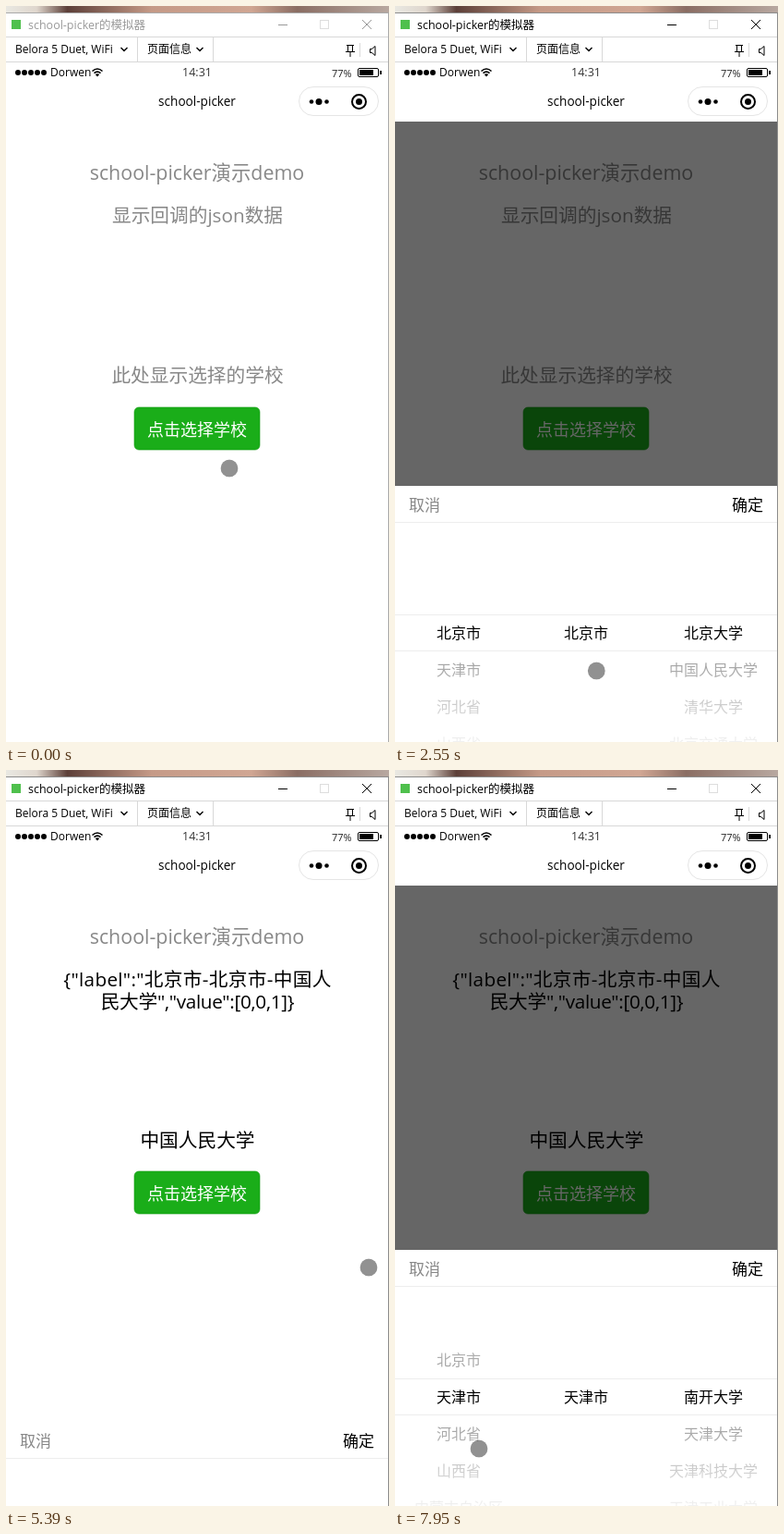
Recreate the animation shown at these times as an HTML page. Size 415 by 796 pixels, loop 8 s.

```html
<!DOCTYPE html>
<html lang="zh-CN">
<head>
<meta charset="utf-8">
<title>school-picker</title>
<style>
  html, body { margin: 0; width: 100%; height: 100%; overflow: hidden; background: #fff; }
  svg { display: block; }
  text { font-family: "Open Sans", "Noto Sans CJK SC", "Noto Sans CJK", sans-serif; white-space: pre; }
  .mid { text-anchor: middle; }
  .end { text-anchor: end; }
  .ui { font-size: 12px; }
  .copy { font-size: 20.7px; text-anchor: middle; }
  .rows { font-size: 16px; text-anchor: middle; }
  .head { font-size: 17px; }
  .line { fill: none; stroke: #000; }
  .rule { fill: none; stroke: #e5e5e5; }
  #window { --ink: #999; --edge: #aaa; }
  #window.active { --ink: #000; --edge: #8c8c8c; }
  #window text { fill: var(--ink); }
  #window path { fill: none; stroke: var(--ink); }
  #button rect { fill: #1aad19; stroke: #179c16; stroke-width: .6; }
  #button text { fill: #fff; font-size: 18px; }
  #button.pressed rect { fill: #179b16; }
  #button.pressed text { fill-opacity: .6; }
</style>
</head>
<body>
<svg width="415" height="796" viewBox="0 0 415 796">
  <defs>
    <linearGradient id="photo">
      <stop offset="0" stop-color="#e9e8e2"/>
      <stop offset=".08" stop-color="#dfd6cd"/>
      <stop offset=".16" stop-color="#5c3f38"/>
      <stop offset=".38" stop-color="#c59a87"/>
      <stop offset=".64" stop-color="#d0a693"/>
      <stop offset=".76" stop-color="#8a6d63"/>
      <stop offset="1" stop-color="#b8a8a0"/>
    </linearGradient>
    <linearGradient id="fadeTop" x2="0" y2="1">
      <stop offset="0" stop-color="#fff" stop-opacity=".95"/>
      <stop offset="1" stop-color="#fff" stop-opacity=".6"/>
    </linearGradient>
    <linearGradient id="fadeBottom" x2="0" y2="1">
      <stop offset="0" stop-color="#fff" stop-opacity=".6"/>
      <stop offset="1" stop-color="#fff" stop-opacity=".95"/>
    </linearGradient>
  </defs>

  <rect width="415" height="796" fill="#fff"/>
  <rect width="415" height="7" fill="url(#photo)"/>

  <!-- window frame -->
  <g id="window">
    <path d="M0 7.5H415M414.5 8V796" style="stroke:var(--edge)"/>
    <rect x="6" y="15" width="10" height="10" fill="#4fc04d"/>
    <text x="24" y="24.5" font-size="12.5">school-picker的模拟器</text>
    <path d="M295 20.5H305M386 15L396 25M396 15L386 25"/>
    <rect x="340.5" y="15.5" width="9" height="9" fill="none" stroke="#ddd"/>
  </g>

  <!-- toolbar -->
  <path class="rule" d="M0 33.5H414M0 60.5H414M142.5 34V60M224.5 34V60M383.5 40V55" style="stroke:#d8d8d8"/>
  <text class="ui" x="10" y="51">Belora 5 Duet, WiFi</text>
  <text class="ui" x="153" y="51">页面信息</text>
  <path class="line" d="M124.5 45L128 48.5L131.5 45M206.5 45L210 48.5L213.5 45" stroke-width="1.4"/>
  <path class="line" d="M369 42.5H377M370.5 43V49M375.5 43V49M368 49.5H378M373 50V55"/>
  <path class="line" d="M394.5 46.5H396.5L400 43.5V53.5L396.5 50.5H394.5Z"/>

  <!-- status bar -->
  <g id="signal"></g>
  <text class="ui" x="48" y="76">Dorwen</text>
  <path class="line" d="M93.5 70.5Q99 65.5 104.5 70.5M95.5 72.7Q99 69.5 102.5 72.7" stroke-width="1.6"/>
  <path d="M96.8 74Q99 72.3 101.2 74L99 76.5Z"/>
  <text class="mid" x="207" y="76" font-size="12.5" fill="#333">14:31</text>
  <text x="353" y="76.5" font-size="11" fill="#222">77%</text>
  <rect class="line" x="381.5" y="67.5" width="22" height="9" rx="1.5"/>
  <rect x="383" y="69" width="15" height="6"/>
  <rect x="405" y="70" width="2" height="4"/>

  <!-- navigation bar -->
  <text class="mid" x="207" y="108" font-size="13.6">school-picker</text>
  <rect class="rule" x="317.5" y="87.5" width="86" height="31" rx="15.5"/>
  <circle cx="331" cy="103.5" r="2.3"/>
  <circle cx="339" cy="103.5" r="3.5"/>
  <circle cx="347.5" cy="103.5" r="2.3"/>
  <circle class="line" cx="382.5" cy="103.5" r="7.5" stroke-width="2"/>
  <circle cx="382.5" cy="103.5" r="3.5"/>

  <!-- page -->
  <text class="mid" x="207" y="188" font-size="21.4" fill="#888">school-picker演示demo</text>
  <g id="before" fill="#888">
    <text class="copy" x="207.5" y="234">显示回调的json数据</text>
    <text class="copy" x="207.5" y="407">此处显示选择的学校</text>
  </g>
  <g id="after">
    <text class="copy" x="207.5" y="233.5" letter-spacing=".3">{"label":"北京市-北京市-中国人</text>
    <text class="copy" x="207.5" y="257.5" letter-spacing="-.3">民大学","value":[0,0,1]}</text>
    <text class="copy" x="207.5" y="408">中国人民大学</text>
  </g>
  <g id="button">
    <rect x="139" y="434" width="136" height="46" rx="5"/>
    <text class="mid" x="207" y="464.5">点击选择学校</text>
  </g>
  <rect id="shade" y="125" width="414" height="671" fill-opacity=".6"/>

  <!-- picker sheet -->
  <g id="sheet">
    <rect width="414" height="278" fill="#fff"/>
    <text class="head" x="15" y="27" fill="#888">取消</text>
    <text class="head end" x="399" y="27">确定</text>
    <svg y="40" width="414" height="238">
      <g class="rows" id="provinces"></g>
      <g class="rows" id="cities"></g>
      <g class="rows" id="schools"></g>
      <rect width="414" height="99" fill="url(#fadeTop)"/>
      <rect y="139" width="414" height="99" fill="url(#fadeBottom)"/>
    </svg>
    <path class="rule" d="M0 39.5H414M0 139.5H414M0 178.5H414" style="stroke:#ededed"/>
  </g>

  <g id="cursor">
    <circle r="9.5" fill-opacity=".43"/>
    <circle r="10.2" fill="none" stroke="#fff" stroke-opacity=".5" stroke-width="1.6"/>
  </g>
</svg>

<script>
const LOOP = 8000, STEP = 134, ROW = 40;
const SHEET = { shut: 796, open: 519, time: 300 };
const OPEN = 1630, CONFIRM = 5120, CLOSE = 5203, REOPEN = 6502, SWITCH = 7800;

// The screen refreshes every STEP, counted anew from each burst of activity
const bursts = [0, 150, 1530, 1690, 2280, 3120, 4060, 5120, 6230, 6590, 7280];

// Pointer glides: start, end, x, y
const home = [242, 500];
const glides = [
  [60, 750, 222, 466],
  [2150, 2540, 218, 719],
  [2540, 2840, 358, 746],
  [3000, 3560, 353, 637],
  [3900, 4400, 353, 717],
  [4460, 4960, 393, 538],
  [5420, 6060, 202, 461],
  [6760, 7140, 91, 774],
  [7150, 7810, 91, 734]
];
const [dragUp, dragDown, dragProvince] = [glides[3], glides[4], glides[8]];

const places = [
  ['北京市', '北京大学 中国人民大学 清华大学 北京交通大学 北京工业大学 北京航空航天大学 北京理工大学'],
  ['天津市', '南开大学 天津大学 天津科技大学 天津工业大学 天津理工大学']
];

const $ = id => document.getElementById(id);
const show = (id, on) => { $(id).style.display = on ? '' : 'none'; };
const move = (id, x, y) => $(id).setAttribute('transform', `translate(${x} ${Math.round(y)})`);

function ease(t, a, b) {
  const u = Math.min(1, Math.max(0, (t - a) / (b - a)));
  return u * u * (3 - 2 * u);
}

function refresh(time) {
  const from = bursts.findLast(b => b <= time);
  return from + Math.floor((time - from) / STEP) * STEP;
}

function pointer(t) {
  let [x, y] = home;
  for (const [a, b, toX, toY] of glides) {
    const p = ease(t, a, b);
    x += (toX - x) * p;
    y += (toY - y) * p;
  }
  return [x, y];
}

function fill(id, x, names) {
  $(id).innerHTML = names.split(' ')
    .map((s, i) => `<text x="${x}" y="${125 + i * ROW}">${s}</text>`).join('');
}

let place = -1;
function setPlace(i) {
  if (i === place) return;
  place = i;
  fill('cities', 207, places[i][0]);
  fill('schools', 345, places[i][1]);
}

$('signal').innerHTML = [0, 1, 2, 3, 4].map(i => `<circle cx="${13 + i * 7}" cy="72" r="3"/>`).join('');
fill('provinces', 69, '北京市 天津市 河北省 山西省 内蒙古自治区 辽宁省');

function render(time) {
  const t = refresh(time);
  const slide = at => ease(t, at, at + SHEET.time);
  const drag = ([a, b]) => ease(t, a, b);
  const tapped = at => t >= at - 100 && t < at + 190;

  $('window').classList.toggle('active', t >= 1530);
  $('button').classList.toggle('pressed', tapped(OPEN) || tapped(REOPEN));
  show('before', t < CONFIRM);
  show('after', t >= CONFIRM);
  show('shade', (t >= OPEN && t < CLOSE) || t >= REOPEN);

  const raised = slide(OPEN) - slide(CLOSE) + slide(REOPEN);
  move('sheet', 0, SHEET.shut + (SHEET.open - SHEET.shut) * raised);

  setPlace(t < SWITCH ? 0 : 1);
  move('provinces', 0, -ROW * drag(dragProvince));
  move('schools', 0, place ? 0 : -ROW * (3 * drag(dragUp) - 2 * drag(dragDown)));
  move('cursor', ...pointer(t));
}

const start = performance.now();
function frame() {
  render((performance.now() - start) % LOOP);
  requestAnimationFrame(frame);
}
frame();
</script>
</body>
</html>
```
